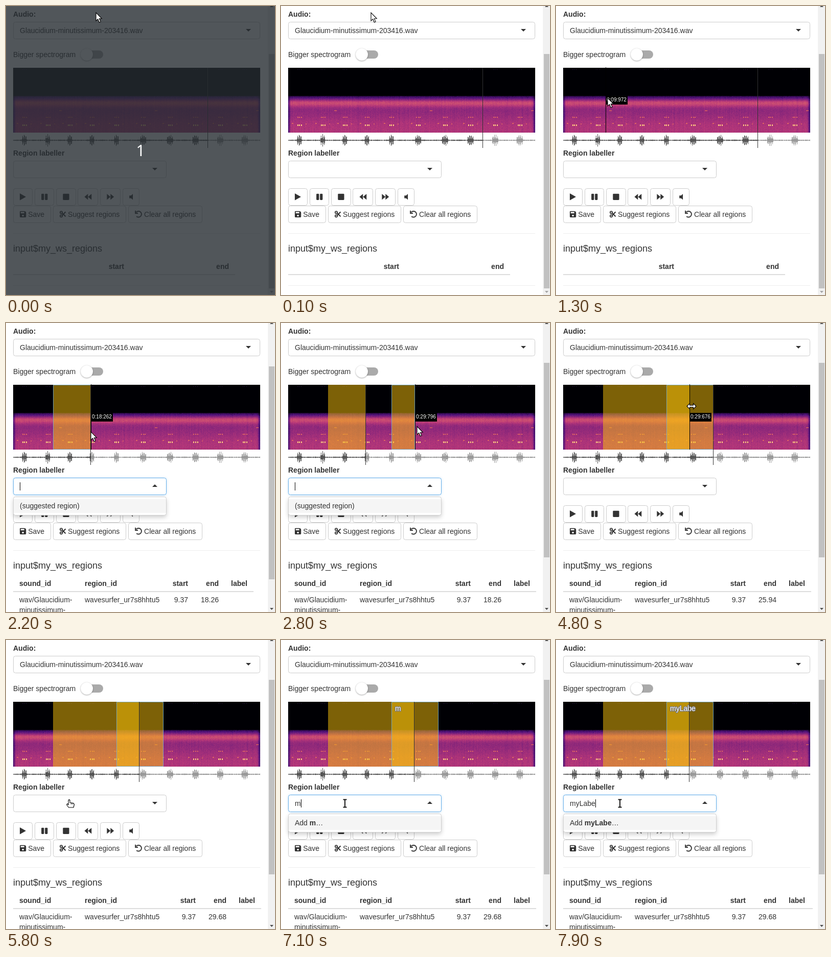
Recreate the animation shown at these times as an HTML page with a canvas. Size 526 by 566 pixels, loop 8 s.

```html
<!DOCTYPE html>
<html lang="en">
<head>
<meta charset="utf-8">
<title>Region labeller</title>
<style>
html, body { margin: 0; width: 526px; height: 566px; overflow: hidden; background: #fff; }
canvas { display: block; }
</style>
</head>
<body>
<canvas id="stage" width="526" height="566"></canvas>
<script>
const W = 526, H = 566, LOOP = 8000, STEP = 100;
const SANS = '"Liberation Sans", Arial, sans-serif';
const INK = '#333', BORDER = '#ccc', FOCUS = '#66afe9';
const SPEC = { x: 14, y: 121, w: 483, h: 127 };
const SEC_PER_PX = 0.120147;
const c = document.getElementById('stage').getContext('2d');

// ---------- helpers ----------
function random(seed) {
  return () => {
    seed = (seed * 1664525 + 1013904223) >>> 0;
    return seed / 4294967296;
  };
}

const clamp = (v, lo = 0, hi = 1) => Math.min(hi, Math.max(lo, v));
const smooth = k => k * k * (3 - 2 * k);
const bell = (d, width) => Math.exp(-((d / width) ** 2));

function text(str, x, y, { size = 14, bold = false, color = INK, align = 'left', family = SANS } = {}) {
  c.font = `${bold ? 'bold ' : ''}${size}px ${family}`;
  c.textAlign = align;
  c.fillStyle = color;
  c.fillText(str, x, y);
  return c.measureText(str).width;
}

function rect(x, y, w, h, color) {
  c.fillStyle = color;
  c.fillRect(x, y, w, h);
}

function shadow(color, blur, dy = 0) {
  c.shadowColor = color;
  c.shadowBlur = blur;
  c.shadowOffsetY = dy;
}

const noShadow = () => shadow('transparent', 0);

function box(x, y, w, h, stroke = BORDER) {
  c.beginPath();
  c.roundRect(x + 0.5, y + 0.5, w - 1, h - 1, 4);
  c.fillStyle = '#fff';
  c.fill();
  noShadow();
  c.lineWidth = 1;
  c.strokeStyle = stroke;
  c.stroke();
}

function round(x, y, w, h, r, color = INK) {
  c.beginPath();
  c.roundRect(x, y, w, h, r);
  c.fillStyle = color;
  c.fill();
}

function trace(points) {
  c.beginPath();
  points.forEach(([x, y], i) => (i ? c.lineTo(x, y) : c.moveTo(x, y)));
}

function poly(points, fill, stroke) {
  trace(points);
  c.closePath();
  c.fillStyle = fill;
  c.fill();
  if (!stroke) return;
  c.strokeStyle = stroke;
  c.lineWidth = 1.1;
  c.stroke();
}

function line(points, color, width) {
  trace(points);
  c.strokeStyle = color;
  c.lineWidth = width;
  c.stroke();
}

function ring(x, y, r, width, from = 0, to = 7) {
  c.beginPath();
  c.arc(x, y, r, from, to);
  c.strokeStyle = INK;
  c.lineWidth = width;
  c.stroke();
}

function triangle(x, y, w, h, color = INK) {
  poly([[x - w / 2, y], [x + w / 2, y], [x, y + h]], color);
}

// ---------- spectrogram and waveform ----------
// Ten bird calls; the spacing tightens around the fourth and fifth.
const calls = Array.from({ length: 10 }, (_, i) => ({
  x: 36 + 47.8 * i - 12.6 * bell(i - 3.5, 2),
  pulses: i < 5 ? 3 : 4
}));
const MAGMA = [[0, 0, 4], [81, 18, 124], [183, 55, 121], [252, 137, 97], [252, 253, 191]];

function magma(v) {
  const p = clamp(v) * 3.999, i = Math.floor(p);
  return MAGMA[i].map((a, k) => a + (MAGMA[i + 1][k] - a) * (p - i));
}

function level(y) {
  const onset = Math.sqrt(clamp((y - 54) / 12));
  return onset * (0.4 + 0.16 * bell(y - 69, 7) + 0.08 * smooth(clamp((y - 80) / 38)));
}

function makeSpectrogram() {
  const rnd = random(7), { w, h } = SPEC;
  const canvas = document.createElement('canvas');
  canvas.width = w;
  canvas.height = h;
  const g = canvas.getContext('2d');
  const img = g.createImageData(w, h);
  const columns = Array.from({ length: w }, () => (rnd() - 0.5) * 0.035);
  for (let y = 0; y < h; y++) {
    const base = level(y);
    for (let x = 0; x < w; x++) {
      const edge = Math.min(1, 0.45 + Math.min(x, w - 1 - x) / 9);
      const noise = columns[x] + (rnd() + rnd() - 1) * 0.045;
      img.data.set([...magma(base ? base * edge + noise : 0), 255], (y * w + x) * 4);
    }
  }
  g.putImageData(img, 0, 0);
  const dot = (x, y, dw, dh, color) => {
    g.fillStyle = color;
    g.fillRect(Math.round(x) - SPEC.x, y - SPEC.y, dw, dh);
  };
  for (const { x } of calls) {
    for (let i = -1; i <= 1; i++) {
      dot(x + i * 3.6, 232, 2, 3, '#fdc97f');
      dot(x + i * 3.6, 217, 2, 2, 'rgba(248,125,90,.75)');
      dot(x + i * 3.6, 124, 1, 1, 'rgba(60,25,100,.7)');
    }
    dot(x - 14, 229, 3, 2, 'rgba(245,120,90,.7)');
    dot(x + 13, 230, 2, 2, 'rgba(245,120,90,.6)');
    if (rnd() < 0.4) dot(x + 23, 204, 5, 2, 'rgba(240,110,85,.6)');
  }
  return canvas;
}

function makeWave() {
  const rnd = random(21);
  return Array.from({ length: SPEC.w }, (_, i) => {
    let amp = 0.5 + rnd() * 0.9;
    for (const { x, pulses } of calls) {
      for (let p = 0; p < pulses; p++) {
        const off = (p - (pulses - 1) / 2) * 3.1;
        amp += (11.5 - Math.abs(off)) * bell(i + SPEC.x - x - off, 1);
      }
    }
    return amp;
  });
}

const spectrogram = makeSpectrogram();
const wave = makeWave();

// ---------- timeline ----------
// Each move: start, end, then the point reached.
const MOVES = [
  [800, 1300, 97, 180], [1300, 1500, 92, 206], [1600, 2100, 166, 213],
  [2400, 2600, 216, 203], [2600, 3000, 308, 202], [3000, 3300, 204, 168],
  [3300, 3500, 182, 165], [3500, 3800, 204, 163], [3900, 4000, 166, 163],
  [4300, 4800, 261, 163], [5200, 5800, 125, 320]
];

function mouseAt(t) {
  let x = 176, y = 13;
  for (const [from, to, tx, ty] of MOVES) {
    const k = smooth(clamp((t - from) / (to - from)));
    x += (tx - x) * k;
    y += (ty - y) * k;
  }
  return { x, y };
}

function stateAt(t) {
  const { x, y } = mouseAt(t);
  const inSound = y >= SPEC.y && y < SPEC.y + SPEC.h;
  const moving = Math.abs(x - mouseAt(t - STEP).x) > 1;
  const px = Math.round(x);
  const letters = t < 7100 ? 0 : t < 7400 ? 1 : 2 + Math.floor((t - 7400) / 100);
  return {
    t, y,
    x: inSound && moving ? x + 4 : x,
    hover: inSound ? px : null,
    firstEnd: t < 1600 ? 92 : t < 2300 ? px : t < 4400 ? 166 : t < 4800 ? px : 261,
    secondEnd: t < 2600 ? 216 : t < 3000 ? px : 308,
    typed: 'myLabe'.slice(0, letters),
    open: (t >= 2100 && t < 4400) || t >= 5900,
    caret: !((t >= 3300 && t < 3700) || (t >= 6500 && t < 7100)),
    rows: t < 2100 ? 0 : t < 2700 ? 1 : 2,
    head: t < 2200 ? 394 : t < 3000 ? 165 : t < 5300 ? 307 : 260,
    end: t < 4700 ? '18.26' : t < 5000 ? '25.94' : '29.68'
  };
}

// ---------- page parts ----------
function drawForm() {
  text('Audio:', 14, 21, { bold: true });
  box(14, 31, 483, 34);
  text('Glaucidium-minutissimum-203416.wav', 27, 53);
  triangle(474, 45, 10, 5);
  text('Bigger spectrogram', 14, 100);
  round(148, 87, 42, 16, 8, '#aaa');
  shadow('rgba(0,0,0,.4)', 2.5, 0.7);
  round(146, 83, 24, 24, 12, '#fff');
  noShadow();
}

function drawRegion(x, end, active) {
  if (end <= x) return;
  rect(x, SPEC.y, end - x, SPEC.h, 'rgba(250,194,10,.5)');
  if (!active) return;
  c.strokeStyle = 'rgba(102,175,233,.75)';
  c.lineWidth = 1;
  c.strokeRect(x + 0.5, SPEC.y + 0.5, end - x - 1, SPEC.h - 1);
}

function clock(x) {
  const ms = Math.round((x - SPEC.x) * SEC_PER_PX * 1000);
  const pad = (n, k) => String(n).padStart(k, '0');
  return `0:${pad(Math.floor(ms / 1000), 2)}:${pad(ms % 1000, 3)}`;
}

function drawSound(s) {
  c.drawImage(spectrogram, SPEC.x, SPEC.y);
  wave.forEach((amp, i) => {
    const x = SPEC.x + i;
    rect(x, 263 - amp, 1, amp * 2, x <= s.head ? '#555' : '#999');
  });
  drawRegion(92, s.firstEnd, s.t < 2500);
  drawRegion(216, s.secondEnd, true);
  if (s.typed) {
    c.font = `14px ${SANS}`;
    c.textAlign = 'left';
    c.lineJoin = 'round';
    c.lineWidth = 2.5;
    c.strokeStyle = '#777';
    c.strokeText(s.typed, 223, 139);
    c.lineJoin = 'miter';
    text(s.typed, 223, 139, { color: '#fff' });
  }
  rect(s.head, SPEC.y, 1, 157, INK);
  if (s.hover !== null) {
    rect(s.hover, 120, 1, 128, '#000');
    rect(s.hover, 176, 43, 17, '#000');
    text(clock(s.hover), s.hover + 2, 187, { size: 10, color: '#fff' });
  }
}

// Icons live on a grid 512 units high.
const icons = {
  play() { poly([[0, 10], [440, 256], [0, 502]], INK); },
  pause() { for (const x of [0, 256]) round(x, 32, 192, 448, 48); },
  stop() { round(0, 32, 448, 448, 48); },
  back() { for (const x of [0, 256]) poly([[x, 256], [x + 250, 50], [x + 250, 462]], INK); },
  forward() { for (const x of [0, 256]) poly([[x + 250, 256], [x, 50], [x, 462]], INK); },
  volume() { poly([[0, 160], [126, 160], [250, 50], [250, 462], [126, 352], [0, 352]], INK); },
  save() {
    round(0, 32, 448, 448, [48, 130, 48, 48]);
    rect(64, 96, 256, 96, '#fff');
    round(160, 288, 128, 128, 64, '#fff');
  },
  cut() {
    for (const side of [-1, 1]) {
      ring(112, 256 + side * 128, 78, 66);
      line([[160, 256 + side * 100], [425, 256 - side * 165]], INK, 75);
    }
  },
  undo() {
    ring(256, 256, 212, 70, -2.5, 2.3);
    line([[36, 0], [36, 188], [212, 188]], INK, 72);
  }
};

function drawRow(y, items) {
  const gap = 3.89;
  let x = 14;
  for (const [icon, width, label] of items) {
    c.font = `14px ${SANS}`;
    const w = 26 + width + (label ? gap + c.measureText(label).width : 0);
    const left = Math.round(x);
    box(left, y, Math.round(x + w) - left, 34);
    c.save();
    c.translate(x + 13, y + 9.75);
    c.scale(14 / 512, 14 / 512);
    icons[icon]();
    c.restore();
    if (label) text(label, x + 13 + width + gap, y + 22);
    x += w + gap;
  }
}

function drawButtons() {
  drawRow(357, [['play', 12.25], ['pause', 12.25], ['stop', 12.25], ['back', 14], ['forward', 14], ['volume', 7]]);
  drawRow(391, [['save', 12.25, 'Save'], ['cut', 12.25, 'Suggest regions'], ['undo', 14, 'Clear all regions']]);
}

function drawLabeller(s) {
  text('Region labeller', 14, 293, { bold: true });
  if (s.open) shadow('rgba(102,175,233,.4)', 5);
  box(14, 303, 300, 34, s.open ? FOCUS : BORDER);
  if (!s.open) {
    triangle(291, 317, 10, 5);
    return;
  }
  triangle(291, 321, 10, -5);
  const w = text(s.typed, 27, 325);
  if (s.caret) rect(27 + Math.round(w), 312, 1, 16, '#000');
  shadow('rgba(0,0,0,.2)', 8, 4);
  box(14, 340, 300, 37, '#d0d0d0');
  rect(15, 345, 298, 27, '#f5f5f5');
  if (s.typed) {
    let x = 27 + text('Add ', 27, 363);
    x += text(s.typed, x, 363, { bold: true });
    text('…', x, 363);
  } else {
    text('(suggested region)', 27, 363);
  }
}

function drawTable(s) {
  const bold = { bold: true }, right = { align: 'right' }, boldRight = { bold: true, align: 'right' };
  rect(14, 445, 483, 1, '#eee');
  text('input$my_ws_regions', 14, 481, { size: 18 });
  if (!s.rows) {
    text('start', 231, 515, boldRight);
    text('end', 436, 515, boldRight);
    rect(14, 525, 434, 2, '#ddd');
    rect(14, 547, 483, 1, '#eee');
    return;
  }
  const dx = (s.rows - 1) * 15;
  text('sound_id', 26, 515, bold);
  text('region_id', 154, 515, bold);
  text('start', 356 + dx, 515, boldRight);
  text('end', 416 + dx, 515, boldRight);
  text('label', 440 + dx, 515, bold);
  rect(14, 525, 470 + dx + (s.t < 7900 ? 0 : 3), 2, '#ddd');
  text('wav/Glaucidium-', 26, 547);
  text('minutissimum-', 26, 567);
  text('wavesurfer_ur7s8hhtu5', 154, 547);
  text('9.37', 356 + dx, 547, right);
  text(s.end, 416 + dx, 547, right);
}

function drawScrollbar(s) {
  const [top, bottom] = [[94, 553], [85, 502], [78, 459]][s.rows];
  rect(512, 0, 14, H, '#f1f1f1');
  rect(514, top, 11, bottom - top, '#c1c1c1');
  triangle(519.5, 2, 7, -4, '#505050');
  triangle(519.5, 558, 7, 4, s.rows ? '#505050' : '#a3a3a3');
}

// ---------- mouse pointers ----------
const pointers = {
  arrow() {
    poly([[0, 0], [0, 16], [3.7, 12.7], [6.3, 19], [9, 17.9], [6.4, 11.8], [11.2, 11.6]], '#fff', '#000');
  },
  resize() {
    const half = [[-9, 0], [-3.5, -5.5], [-3.5, -1.7], [3.5, -1.7], [3.5, -5.5]];
    poly([...half, ...half.map(([x, y]) => [-x, -y])], '#fff', '#000');
  },
  hand() {
    c.lineJoin = 'round';
    poly([[-3, 3], [-3, -6], [-1.5, -7.5], [0, -6], [0, -1.5], [7, -0.5], [8.5, 2], [7, 8],
      [-2.5, 8], [-6.5, 2.5], [-5, 0.7]], '#fff', '#000');
    for (const x of [2.5, 5.3]) line([[x, -1], [x, 2]], '#000', 1);
  },
  beam() {
    for (const [color, width] of [['#fff', 3.6], ['#000', 1.8]]) {
      for (const y of [-7.5, 7.5]) line([[-3.5, y], [3.5, y]], color, width);
      line([[0, -7.5], [0, 7.5]], color, width);
    }
  }
};

function drawPointer({ t, x, y }) {
  const kind = t >= 6100 ? 'beam' : y > 303 ? 'hand' : t >= 4100 && t < 5300 ? 'resize' : 'arrow';
  c.save();
  c.translate(x, y);
  pointers[kind]();
  c.restore();
}

function draw(t) {
  const s = stateAt(t);
  rect(0, 0, W, H, '#fff');
  drawForm();
  drawSound(s);
  drawButtons();
  drawLabeller(s);
  drawTable(s);
  drawScrollbar(s);
  if (t < 100) {
    rect(0, 0, W, H, 'rgba(38,44,49,.8)');
    text('1', 263, 294, { size: 30, color: '#fff', align: 'center', family: '"Noto Sans", "Open Sans", sans-serif' });
  }
  drawPointer(s);
}

const begin = performance.now();
function tick() {
  const t = (performance.now() - begin) % LOOP;
  draw(Math.floor(t / STEP) * STEP);
  requestAnimationFrame(tick);
}
tick();
</script>
</body>
</html>
```
